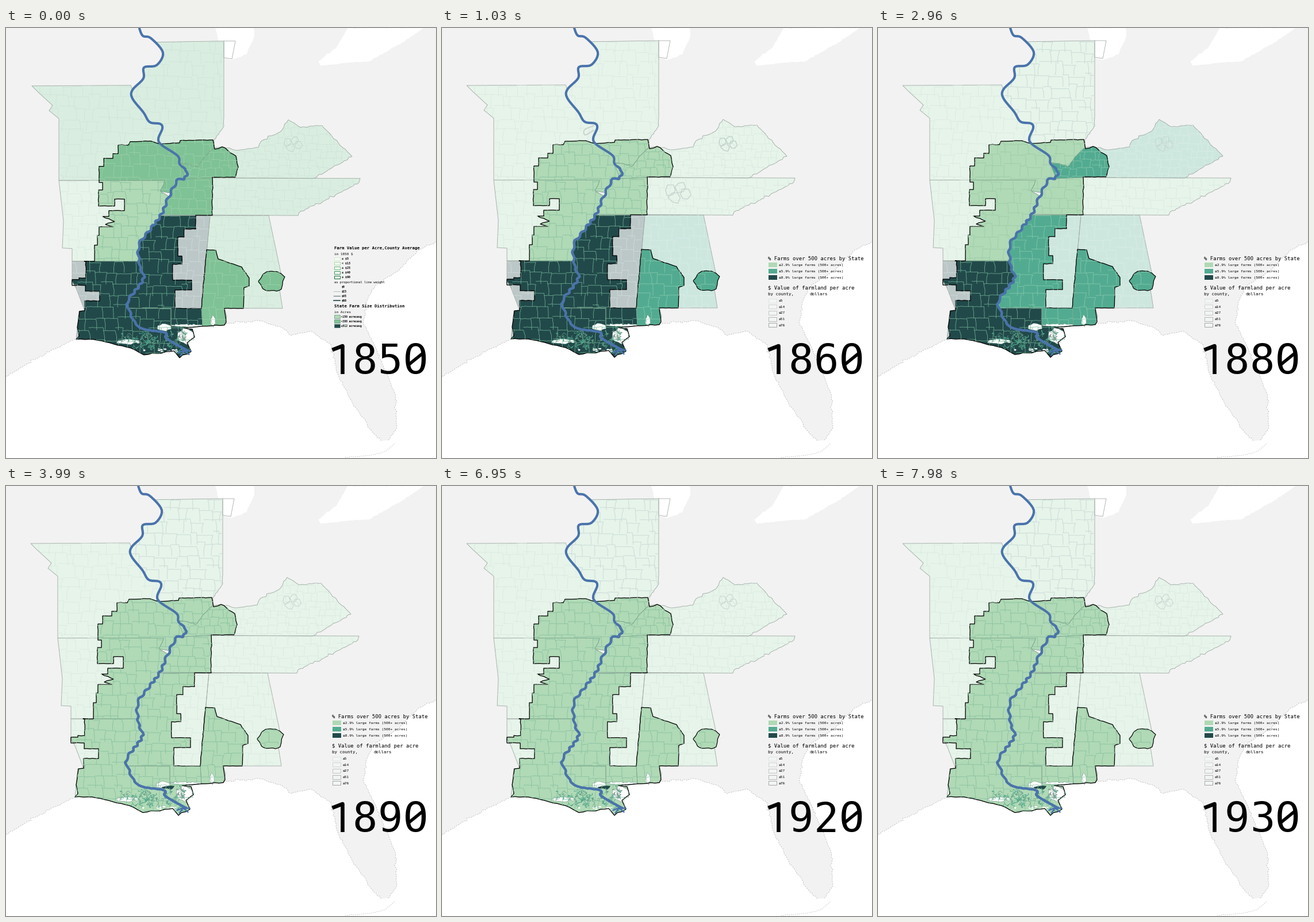
Animation, 748 px wide and 748 px high, one loop 8000 ms. Source, as a matplotlib script:

```python
import math
import numpy as np
import matplotlib.pyplot as plt
from matplotlib.animation import FuncAnimation
from matplotlib.collections import LineCollection
from matplotlib.patches import Polygon, Rectangle
from matplotlib.path import Path

SIZE, DPI = 748, 64
PT = 72 / DPI
STEP, LOOP = 20, 8000
SWITCHES = [1030, 1960, 2960, 3990, 4990, 6020, 6950, 7980]
MONO = "DejaVu Sans Mono"

DARK, TEAL, GREEN, LIGHT = "#22494a", "#52ab90", "#7fc295", "#b0d9b5"
PALE, MINT, AQUA, GREY = "#e6f4ea", "#d9eee0", "#cde7df", "#bcc8c8"
COUNTY = {DARK: "#74b898", TEAL: "#8acbb0", GREEN: "#9fd2ab", LIGHT: "#82bf9f",
          PALE: "#d7e6dd", MINT: "#cde1d6", AQUA: "#dff0ea", GREY: "#d8e0e0"}
RIVER_BLUE = "#4a73ab"


# ---- shape rules ------------------------------------------------------------
def smooth(keys, n=6):
    """Catmull-Rom curve through the key points."""
    p = np.array([keys[0], *keys, keys[-1]], float)
    t = np.linspace(0, 1, n, endpoint=False)[:, None]
    parts = [b + t * (c - a) / 2 + t**2 * (2 * a - 5 * b + 4 * c - d) / 2
             + t**3 * (3 * b - 3 * c + d - a) / 2
             for a, b, c, d in zip(p, p[1:], p[2:], p[3:])]
    return [tuple(q) for q in np.vstack(parts + [p[-1:]])]


def rough(keys, amp, step=4, seed=1, closed=False):
    """Split a line into short pieces and shake the new points."""
    rng = np.random.default_rng(seed)
    keys = list(keys) + [keys[0]] if closed else list(keys)
    out = []
    for a, b in zip(keys, keys[1:]):
        n = max(1, int(math.dist(a, b) / step))
        for k in range(n):
            shake = rng.normal(0, amp, 2) if k else (0, 0)
            out.append(tuple(np.array(a) + (np.array(b) - a) * k / n + shake))
    return out + [keys[-1]]


def stairs(*keys):
    """Right-angled county steps: up or down first, then sideways."""
    out = [keys[0]]
    for (x, _), (u, v) in zip(keys, keys[1:]):
        out += [(x, v), (u, v)]
    return out


def ragged_ellipse(cx, cy, rx, ry, amp, n=14, seed=1):
    rng = np.random.default_rng(seed)
    a = np.arange(n) * 2 * math.pi / n
    r = 1 + rng.uniform(-amp, amp, n)
    return [tuple(p) for p in np.c_[cx + rx * r * np.cos(a), cy + ry * r * np.sin(a)]]


# ---- geography, in pixels ---------------------------------------------------
RIVER = smooth([(230, 0), (236, 13), (250, 17), (271, 42), (260, 64), (238, 68), (237, 87),
                (218, 107), (218, 122), (237, 146), (248, 163), (266, 166), (270, 174),
                (263, 192), (269, 203), (297, 222), (300, 236), (312, 248), (309, 261),
                (296, 265), (279, 298), (268, 324), (247, 352), (229, 378), (231, 415),
                (237, 436), (211, 472), (211, 487), (230, 520), (274, 529), (278, 540),
                (313, 560)])


def river(top, bottom):
    return [p for p in RIVER if top <= p[1] <= bottom]


WEST = (stairs((152, 405), (157, 377), (160, 360), (184, 345)) + [(171, 341), (187, 336), (166, 327)]
        + stairs((177, 327), (204, 317), (187, 297), (159, 309), (166, 281), (160, 268),
                 (168, 240), (184, 226), (193, 218), (211, 203)))
NORTH = ([(214, 197), (250, 196), (266, 201), (300, 199), (301, 195), (358, 194)]
         + rough([(361, 210), (374, 206), (398, 222), (402, 241), (397, 259)], 1, 5)
         + rough([(357, 259), (357, 325)], 1, 6))
EAST = (stairs((328, 325), (308, 349), (297, 363), (304, 396), (288, 410), (321, 438),
               (292, 455), (338, 487))
        + [(347, 385), (363, 386), (367, 401), (408, 415), (421, 434), (421, 448), (412, 451),
           (411, 487), (378, 487), (381, 511)])
GULF = rough([(378, 516), (340, 518), (306, 521), (322, 523), (326, 537), (313, 547),
              (320, 562), (300, 573), (290, 561), (238, 568), (215, 556), (185, 549),
              (150, 541), (120, 541)], .6, 7)
SABINE = ([(125, 535), (122, 520), (126, 492)]
          + stairs((135, 491), (161, 474), (136, 457), (113, 447), (125, 437), (137, 434),
                   (134, 405)))
DELTA = WEST + NORTH + EAST + GULF + SABINE
ISLET = ragged_ellipse(460, 440, 22, 18, .14, 16, 3)

LAND_W = rough([(0, 606), (60, 571), (120, 541), (200, 530), (290, 512), (384, 514), (440, 509),
                (480, 521), (497, 535), (530, 527), (566, 552), (578, 605), (600, 647),
                (640, 706), (653, 718)], 1)
LAND_E = rough([(665, 717), (680, 695), (677, 637), (644, 558), (622, 515), (627, 476),
                (641, 449), (684, 421), (715, 388), (748, 371)], 1)
LAKES = [[(364, 0), (374, 40), (378, 52), (391, 56), (418, 46), (432, 15), (431, 0)],
         [(594, 0), (575, 34), (543, 58), (548, 66), (600, 60), (632, 58), (690, 25), (727, 0)]]
BAYS = [ragged_ellipse(273, 520, 12, 6, .15), ragged_ellipse(210, 545, 19, 4, .25),
        ragged_ellipse(310, 535, 14, 13, .2), ragged_ellipse(358, 509, 4, 9, .25),
        ragged_ellipse(312, 517, 27, 2, .2)]

OHIO = rough([(316, 236), (330, 241), (345, 222), (360, 208)], .8)
BOOT = [(266, 283), (272, 272), (274, 264.5)]
KY_NORTH = rough([(374, 206), (398, 212), (437, 207), (442, 196), (475, 180), (489, 159),
                  (510, 172), (548, 169), (576, 199), (600, 223), (533, 261)], .9, 5)
STATES = {
    "IL": river(22, 235) + OHIO + rough([(360, 194), (377, 170), (377, 155)], 1) + [(377, 22)],
    "MO": [(43, 100), (215, 99)] + river(105, 290) + BOOT
          + [(90, 264.5), (90, 157), (73, 143), (79, 134), (53, 110)],
    "AR": [(90, 264.5)] + BOOT[::-1] + river(290, 403)
          + [(231, 405), (113, 405), (113, 383), (96, 382), (98, 335)],
    "KY": [(299, 235)] + OHIO + KY_NORTH + [(357, 260), (310, 262)],
    "TN": [(310, 262), (357, 260), (614, 261)] + rough([(612, 268), (560, 296), (508, 320)], 1)
          + [(506, 325.5)] + river(262, 326)[::-1],
    "MS": [(268, 325.5), (353, 325.5), (338, 487), (340, 517), (285, 516), (285, 487)]
          + river(326, 487)[::-1],
    "AL": [(353, 325.5), (455, 325.5), (476, 425), (474, 455), (479, 487), (378, 487), (382, 501),
           (378, 516), (340, 518), (338, 487)],
    "LA": [(113, 405), (231, 405)] + river(406, 487) + [(285, 487), (285, 516)]
          + [p for p in GULF if p[0] < 330] + [(125, 492), (135, 491), (120, 452), (113, 440)],
}
CELL = {"KY": 14, "TN": 18}
DELTA_PATHS = [Path(DELTA), Path(ISLET)]


def county_lines(outline, cell, seed):
    """Staggered crooked cells inside a state, split into outer and delta pieces."""
    rng = np.random.default_rng(seed)
    x0, y0 = np.min(outline, 0) - cell
    x1, y1 = np.max(outline, 0) + cell
    pieces = []
    for i, y in enumerate(np.arange(y0, y1, cell)):
        xs = np.arange(x0, x1, cell) + (i % 2) * cell / 2
        xs += rng.uniform(-.3, .3, len(xs)) * cell
        ys = y + rng.choice([-4, 0, 0, 3], len(xs)) + rng.uniform(-1, 1, len(xs))
        for x, right, top in zip(xs, xs[1:], ys):
            bend = right + rng.uniform(-3, 3)
            shape = rough([(x, top), (right, top), (bend, y + cell / 2), (bend, y + cell)], .3, 3)
            pieces += zip(shape, shape[1:])
    pieces = np.array(pieces)
    pieces = pieces[Path(outline).contains_points(pieces.mean(1))]
    inside = np.any([p.contains_points(pieces.mean(1)) for p in DELTA_PATHS], axis=0)
    return pieces[~inside], pieces[inside]


COUNTIES = {name: county_lines(outline, CELL.get(name, 20), k)
            for k, (name, outline) in enumerate(STATES.items())}


def palette(year):
    outer, inner = dict.fromkeys(STATES, PALE), dict.fromkeys(STATES, LIGHT)
    if year == 1850:
        outer = dict.fromkeys(STATES, MINT) | {"AR": PALE, "LA": GREY, "MS": GREY}
        inner = dict.fromkeys(STATES, GREEN) | {"AR": LIGHT, "LA": DARK, "MS": DARK}
    elif year == 1860:
        outer |= {"AL": AQUA, "LA": GREY, "MS": GREY}
        inner |= {"AL": TEAL, "LA": DARK, "MS": DARK}
    elif year == 1880:
        outer |= {"AL": AQUA, "MS": AQUA, "KY": AQUA, "LA": GREY}
        inner |= {"AL": TEAL, "MS": TEAL, "KY": TEAL, "LA": DARK}
    return outer, inner


# ---- drawing ----------------------------------------------------------------
fig = plt.figure(figsize=(SIZE / DPI, SIZE / DPI), dpi=DPI, facecolor="white")
base = fig.add_axes([0, 0, 1, 1])
chart = fig.add_axes([0, 0, 1, 1])


def area(ax, points, face, edge="none", width=0.0):
    return ax.add_patch(Polygon(points, fc=face, ec=edge, lw=width * PT, joinstyle="round"))


def line(ax, points, color, width, **style):
    ax.plot(*np.transpose(points), color=color, lw=width * PT, solid_joinstyle="round", **style)


def label(x, y, text, size, weight="normal"):
    base.text(x, y, text, size=size * PT, family=MONO, weight=weight, va="center_baseline")


def swatch(x, y, w, h, face, edge="none", width=0.0):
    base.add_patch(Rectangle((x, y - h / 2), w, h, fc=face, ec=edge, lw=width * PT))


def draw_land(year):
    area(base, [(0, 0)] + LAND_W + LAND_E + [(SIZE, 0)], "#f0f2f0" if year == 1870 else "#f2f2f2")
    for coast in (LAND_W, LAND_E):
        line(base, coast, "#a8a8a8", .6, dashes=(4, 3))
    for lake in LAKES:
        area(base, rough(lake, .6, closed=True), "white")
    keys = smooth([(590, 747), (650, 740), (677, 722)])
    line(base, rough(keys, .8, 3), "#a8a8a8", .7, dashes=(2, 3))


def draw_cluster(cx, cy, r, width):
    for k in range(4):
        a = k * math.pi / 2 + .4
        cell = ragged_ellipse(cx + r * math.cos(a), cy + .7 * r * math.sin(a), .7 * r, .7 * r,
                              .2, 6, k)
        area(chart, cell, "none", "#c2d2cc", width)


def draw_highlights(year):
    draw_cluster(497, 201, 10, 1.5 if year == 1860 else .9)
    if year == 1860:
        draw_cluster(410, 286, 14, 1.3)
    if year in (1860, 1870, 1900):
        line(chart, smooth([(264, 170), (248, 177), (249, 186), (264, 178)]), "#c8d0cc", 1.8)
    if year == 1900:
        line(chart, stairs((347, 39), (358, 39), (366, 46), (377, 57), (377, 63)), "#c6d2d0", 1.8)


def draw_marsh(year):
    rng = np.random.default_rng(9)
    delta = DELTA_PATHS[0]
    for k in range(80):
        start = rng.uniform((195, 528), (314, 566))
        walk = start + np.cumsum(rng.normal(0, 1.9, (9, 2)), 0)
        if delta.contains_points(walk).all():
            line(chart, walk, "#4fa98d" if k % 2 else "#5f9f88", .7)
    for bay in BAYS:
        area(chart, rough(bay, .8, 3, closed=True), "white", "#6c9c88", .6)
    for k in range(16):
        x = rng.uniform(235, 300)
        area(chart, ragged_ellipse(x, 563 - rng.uniform(0, 5), 2.5, 1.3, .5, 7, k), "white")
    for _ in range(12):
        walk = rng.uniform((299, 526), (311, 543)) + np.cumsum(rng.normal(0, 1.6, (8, 2)), 0)
        line(chart, walk, "#7d9d90", .6)
    if year >= 1890:
        area(chart, ragged_ellipse(283, 524, 11, 3.5, .4, 10, 2), DARK)


def draw_river():
    style = dict(color=RIVER_BLUE, solid_capstyle="round")
    north = rough(river(0, 240), .5, 4)
    south = np.array(rough(river(240, 600), 0, 2))
    k = np.arange(len(south))
    sway = np.where(south[:, 1] < 515, 1.7, .8) * np.sin(k + 2 * np.sin(k * .13))
    south += np.c_[sway, sway / 2]
    line(chart, north, width=4.1, **style)
    line(chart, south, width=4.4, **style)
    for a in np.radians([0, 40, 125, 160]):
        tip = (308 + 11 * math.cos(a), 560 + 11 * math.sin(a))
        line(chart, [(308, 560), tip], width=2.6, **style)


def draw_map(year):
    outer, inner = palette(year)
    for name, outline in STATES.items():
        area(chart, outline, outer[name])
        strong = name == "IL" and year >= 1880
        chart.add_collection(LineCollection(COUNTIES[name][0], lw=(.9 if strong else .6) * PT,
                                            colors="#c9d9d5" if strong else COUNTY[outer[name]]))
    draw_highlights(year)
    area(chart, [(377, 22), (397, 22), (391, 53), (377, 51)], "white", "#a3a8a5", .8)
    for outline in STATES.values():
        area(chart, outline, "none", "#a3aca7", .9)

    for name, outline in STATES.items():
        fill = area(chart, outline, inner[name])
        fill.set_clip_path(DELTA_PATHS[0], chart.transData)
    area(chart, ISLET, inner["AL"])
    for name, outline in STATES.items():
        faint = year in (1870, 1880) and inner[name] == LIGHT
        color = "#9bcaa8" if faint else COUNTY[inner[name]]
        chart.add_collection(LineCollection(COUNTIES[name][1], colors=color, lw=.75 * PT))
        border = area(chart, outline, "none", "#7fa890", .8)
        border.set_clip_path(DELTA_PATHS[0], chart.transData)

    draw_marsh(year)
    area(chart, rough(DELTA, .3, 5, closed=True), "none", "black", 1.3)
    area(chart, rough(ISLET, .5, closed=True), "none", "black", 1.2)
    draw_river()


def legend_first():
    label(571, 382, "Farm Value per Acre,County Average", 7.3, "bold")
    label(571, 392.5, "in 1850 $", 6)
    for k, text in enumerate(["≤ $5", "< $13", "≤ $25", "≤ $40", "≤ $60"]):
        y = 401 + 8 * k
        swatch(571, y, 10, 5, "#f6faf7", plt.cm.Greens(.2 + .18 * k), .9)
        label(584, y, text, 5, "bold")
    label(571, 441.5, "as proportional line weight", 5.5)
    for k, text in enumerate(["$0", "$23", "$45", "$68"]):
        y = 450 + 8 * k
        if k:
            line(base, [(570, y), (581, y)], DARK, .5 + .4 * k, alpha=k / 3)
        label(584, y, text, 5, "bold")
    label(571, 483, "State Farm Size Distribution", 7.3, "bold")
    label(571, 493.5, "in Acres", 6)
    for k, (color, text) in enumerate([(LIGHT, "<150"), (GREEN, "<300"), (DARK, "≤512")]):
        y = 502 + 8 * k
        swatch(571, y, 10, 5.5, color, "#3f6a60", .5)
        label(583, y, text + " acresavg", 4.5, "bold")


def legend_later():
    label(567, 400, "% Farms over 500 acres by State", 8.85)
    for k, (color, share) in enumerate([(LIGHT, 2.9), (TEAL, 5.9), (DARK, 8.9)]):
        y = 412 + 11 * k
        swatch(568, y, 15, 7.5, color)
        label(586, y, f"≤{share}% large farms (500+ acres)", 6.26)
    label(567, 451.5, "$ Value of farmland per acre", 8.85)
    label(567, 462.5, "by county,", 7.4)
    label(640, 462.5, "dollars", 7.4)
    for k, value in enumerate([5, 14, 27, 51, 76]):
        y = 474 + 10.7 * k
        swatch(568, y, 14, 7, "#f1f5f3", str(.87 - .07 * k), .8)
        label(586, y, f"≤{value}", 6.3)


def draw_year(year):
    """Big digits with a footless one and a slashed zero."""
    for k, digit in enumerate(str(year)):
        x = 579.5 + 44.5 * k
        if digit == "1":
            line(base, [(x - 12, 560), (x + 6, 553), (x + 6, 602)], "black", 6.6,
                 solid_capstyle="butt")
            continue
        base.text(x, 601.5, "O" if digit == "0" else digit, size=72 * PT, family=MONO,
                  ha="center", va="baseline")
        if digit == "0":
            line(base, [(x - 13, 586), (x + 13, 565)], "black", 5.5, solid_capstyle="butt")


def render(year):
    dx, dy = (2, .7) if year == 1850 else (0, 0)
    for ax, x, y in ((base, 0, 0), (chart, dx, dy)):
        ax.clear()
        ax.set(xlim=(-x, SIZE - x), ylim=(SIZE - y, -y))
        ax.axis("off")
    draw_land(year)
    draw_map(year)
    legend_first() if year == 1850 else legend_later()
    draw_year(year)
    fig.canvas.draw()
    return np.array(fig.canvas.buffer_rgba())


pages = [render(year) for year in range(1850, 1940, 10)]
fig.clear()
screen = fig.figimage(pages[0])


def update(frame):
    time = (frame + .5) * STEP
    screen.set_data(pages[sum(time >= s for s in SWITCHES)])
    return [screen]


animation = FuncAnimation(fig, update, frames=LOOP // STEP, interval=STEP,
                          repeat=True, repeat_delay=0, blit=False)
plt.show()
```
